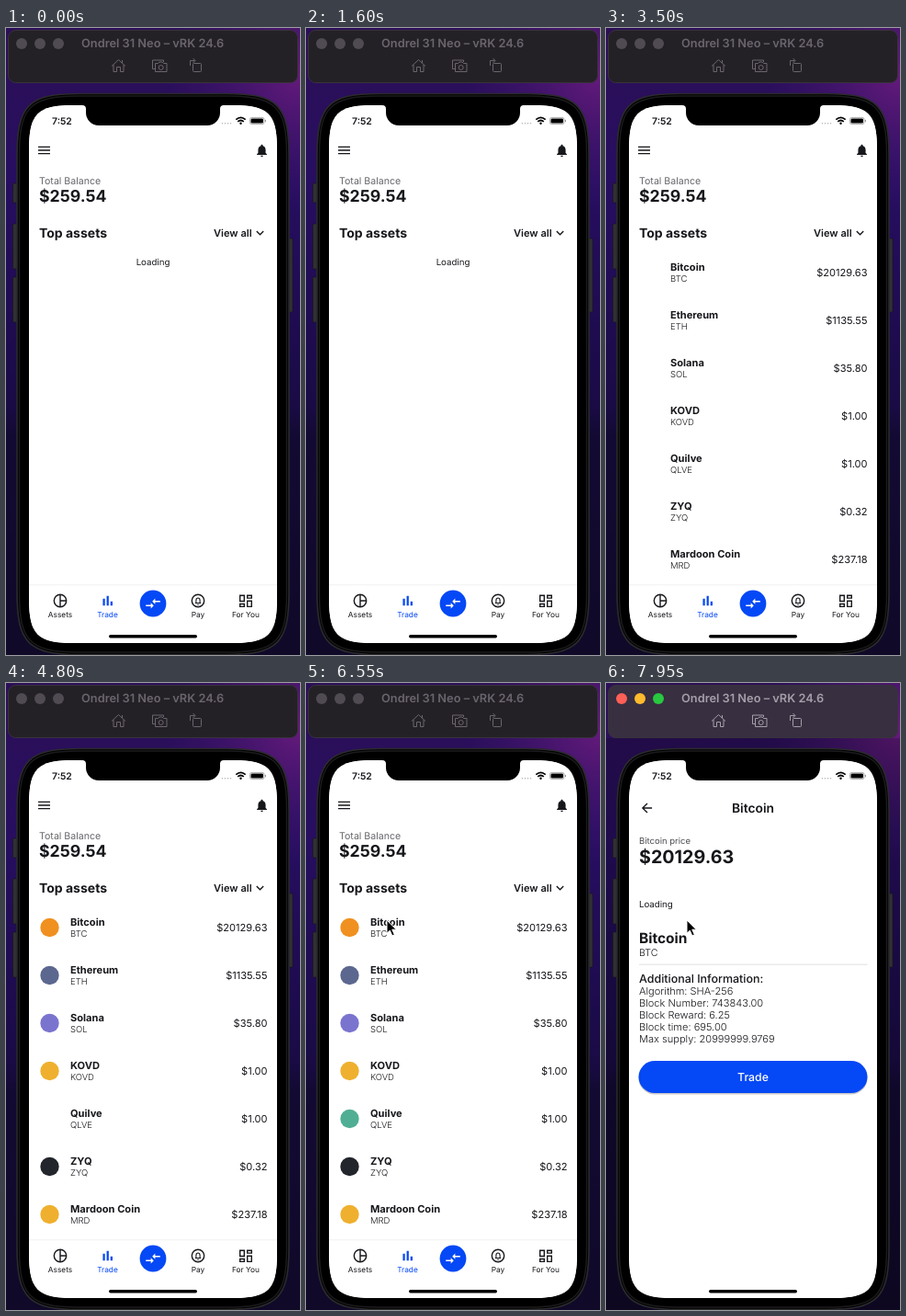
These frames come from a looping animation (320x682 px, 8 s). An HTML page:

```html
<!DOCTYPE html>
<html lang="en">
<head>
<meta charset="utf-8">
<title>Wallet</title>
<style>
html, body { margin: 0; width: 100%; height: 100%; overflow: hidden; background: #170b38; }
svg { display: block; width: 100vw; height: 100vh; }
text { font-family: Inter, Roboto, sans-serif; fill: currentColor; text-rendering: geometricPrecision; }
#chrome { color: #6a656e; }
#screen { color: #16171b; }
.line { fill: none; stroke: currentColor; }
</style>
</head>
<body>
<svg id="stage" viewBox="0 0 320 682"></svg>
<script>
const LOOP = 8000;
const FOCUS = 6900, LIST = 2200, PUSH = 7550, PUSH_END = 7940;
const BLUE = '#0548f5';

const ICONS = {
  menu: 'M3 18h18v-2H3zm0-5h18v-2H3zm0-7v2h18V6z',
  bell: 'M12 22c1.1 0 2-.9 2-2h-4c0 1.1.9 2 2 2zm6-6v-5c0-3.1-1.6-5.6-4.5-6.3V4c0-2-3-2-3 0v.7C7.6 5.4 6 7.9 6 11v5l-2 2v1h16v-1z',
  down: 'M16.6 8.6 12 13.2 7.4 8.6 6 10l6 6 6-6z',
  back: 'M20 11H7.8l5.6-5.6L12 4l-8 8 8 8 1.4-1.4L7.8 13H20z',
  bars: 'M5 9h3v10H5zm5.5-4h3v14h-3zM16 13h3v6h-3z',
  swap: 'M9 14H2v2h7v3l4-4-4-4zm6-1v-3h7V8h-7V5l-4 4z'
};

// name, ticker, price, disc colour, time the disc appears
const COINS = [
  ['Bitcoin', 'BTC', '$20129.63', '#f09020', 3700],
  ['Ethereum', 'ETH', '$1135.55', '#5c678f', 3800],
  ['Solana', 'SOL', '$35.80', '#7a74cf', 3900],
  ['KOVD', 'KOVD', '$1.00', '#efb02f', 4000],
  ['Quilve', 'QLVE', '$1.00', '#50ae94', 5200],
  ['ZYQ', 'ZYQ', '$0.32', '#23252c', 4150],
  ['Mardoon Coin', 'MRD', '$237.18', '#efb02f', 4450]
];

const text = (x, y, size, weight, str, attrs = '') =>
  `<text x="${x}" y="${y}" font-size="${size}" font-weight="${weight}" ${attrs}>${str}</text>`;
const icon = (name, x, y, scale, fill = 'currentColor') =>
  `<path d="${ICONS[name]}" fill="${fill}" transform="translate(${x} ${y}) scale(${scale}) translate(-12 -12)"/>`;
const box = (x, y, w, h, r, fill, attrs = '') =>
  `<rect x="${x}" y="${y}" width="${w}" height="${h}" rx="${r}" fill="${fill}" ${attrs}/>`;
const disc = (x, y, r, fill, attrs = '') =>
  `<circle cx="${x}" cy="${y}" r="${r}" fill="${fill}" ${attrs}/>`;
const MID = 'text-anchor="middle"', END = 'text-anchor="end"';

// Rectangle with continuous corners: long, soft curves instead of plain arcs.
const smooth = (x, y, w, h, r, fill, attrs = '') => {
  const a = 1.5 * r, b = a - .28 * r;
  return `<path fill="${fill}" ${attrs} d="M${x + a} ${y}h${w - 2 * a}c${b} 0 ${a} ${a - b} ${a} ${a}v${h - 2 * a}` +
    `c0 ${b} ${b - a} ${a} ${-a} ${a}h${2 * a - w}c${-b} 0 ${-a} ${b - a} ${-a} ${-a}v${2 * a - h}c0 ${-b} ${a - b} ${-a} ${a} ${-a}z"/>`;
};
const glass = smooth(25, 84, 270, 585, 32.5, '#fff');

const defs = `<defs>
  <linearGradient id="sky" x2="0" y2="1">
    <stop stop-color="#2c0f57"/><stop offset=".25" stop-color="#270e60"/>
    <stop offset=".45" stop-color="#1f0c52"/><stop offset=".6" stop-color="#1a0b45"/>
    <stop offset=".65" stop-color="#130a33"/><stop offset="1" stop-color="#100928"/>
  </linearGradient>
  <radialGradient id="glow" gradientUnits="userSpaceOnUse" cx="320" cy="50" r="150">
    <stop stop-color="#80208a" stop-opacity=".7"/><stop offset="1" stop-color="#4a187c" stop-opacity="0"/>
  </radialGradient>
  <clipPath id="glass">${glass}</clipPath>
</defs>`;

const backdrop = box(0, 0, 320, 682, 0, 'url(#sky)') + box(0, 0, 320, 682, 0, 'url(#glow)') +
  box(0, 60, 320, 622, 0, '#000', 'id="shade" opacity="0"');

const chrome = `<g id="chrome">
  ${box(2.5, 2.5, 315, 57, 8, '#242126', 'id="bar" stroke="#38333c"')}
  ${[17, 37, 57].map(x => disc(x, 17, 6, '#504b53', 'class="light"')).join('')}
  ${text(82, 21, 12.8, 600, 'Ondrel 31 Neo – vRK 24.6')}
  <g class="line" stroke-width="1">
    <path d="M115 41.5 122.5 34.5 130 41.5M117 40v7.5h3.5v-5h4v5h3.5V40M126.5 38v-3"/>
    <path d="M162 44.5h-2.5v-9.5h12v2M162.5 38.5h3l1.5-1.5h3l1.5 1.5h3.5v9h-12.500z"/>
    <circle cx="168.700" cy="43" r="2.500"/>
    <rect x="203.500" y="38.500" width="9" height="9" rx="1"/>
    <path d="M200.500 41v-5.500h5M203.500 33l2.500 2.500-2.500 2.500"/>
  </g>
</g>`;

const button = (x, y, h) => box(x, y, 5, h, 1, '#303033', 'stroke="#17171a" stroke-width=".6"');
const phone = button(7.5, 169, 21) + button(7.5, 213, 49) + button(7.5, 271, 49) + button(307, 229, 80) +
  smooth(12, 71.5, 296, 610, 45, '#000', 'stroke="#2b2b2e" stroke-width="1.6"') +
  smooth(14.5, 74, 291, 605, 42.5, 'none', 'stroke="#1b1b1d" stroke-width="1.5"') + glass;

const row = ([name, ticker, price, colour], i) => `<g transform="translate(0 ${52 * i})">
  ${disc(47.5, 266, 10.2, colour, 'class="coin"')}
  ${text(70, 263.5, 11.1, 700, name)}
  ${text(70, 275.5, 9.5, 300, ticker)}
  ${text(284.5, 269.5, 11.07, 400, price, END)}
</g>`;

const tabs = box(25, 606, 270, 63, 0, '#fff') + box(25, 605.5, 270, .7, 0, '#e9e9ec') +
  `<g class="line" stroke-width="1.4">
    <circle cx="59" cy="623" r="6.7"/><path d="M59 616.3v13.4M59 623h6.7"/>
    <circle cx="209" cy="623" r="6.7"/>
    <path d="M254.7 617.2h4.6v6.3h-4.6zM262.7 617.2h4.6v2.9h-4.6zM254.7 626.5h4.6v2.9h-4.6zM262.7 623.2h4.6v6.2h-4.6z"/>
    <path stroke-width="1.1" d="M205.8 625.5h6.4M206.9 625.5v-2.8c0-3.6 4.2-3.6 4.2 0v2.8M208.2 627.3h1.6"/>
  </g>` +
  icon('bars', 110.7, 623, .75, BLUE) + disc(160, 626, 14.4, BLUE) + icon('swap', 160, 626, .78, '#fff') +
  [[59, 'Assets'], [110.5, 'Trade', BLUE], [209, 'Pay'], [261, 'For You']]
    .map(([x, label, fill]) => text(x, 640.7, 8.3, 400, label, MID + (fill ? ` style="fill:${fill}"` : ''))).join('');

const home = `<g id="home">
  ${box(25, 84, 270, 585, 0, '#fff')}
  ${icon('menu', 41.5, 133, .72)}${icon('bell', 278.5, 133.2, .68)}
  ${text(36, 170, 10.6, 400, 'Total Balance', 'style="fill:#65666b"')}
  ${text(36, 189.3, 17.7, 700, '$259.54')}
  ${text(36, 227.5, 14, 700, 'Top assets')}
  ${text(226, 227, 11.07, 600, 'View all')}${icon('down', 276.5, 223, .7)}
  ${text(160, 257.5, 9.69, 400, 'Loading', MID + ' id="loading"')}
  <g id="list">${COINS.map(row).join('')}</g>
  ${tabs}
</g>`;

const facts = ['Algorithm: SHA-256', 'Block Number: 743843.00', 'Block Reward: 6.25',
  'Block time: 695.00', 'Max supply: 20999999.9769'];
const detail = `<g id="detail">
  ${box(25, 84, 270, 585, 0, '#fff')}
  ${icon('back', 44.5, 136, .7)}
  ${text(160, 141, 13.84, 600, 'Bitcoin', MID)}
  ${text(36, 174.5, 9.5, 400, 'Bitcoin price', 'style="fill:#4b4c50"')}
  ${text(36, 196.3, 19.7, 700, '$20129.63')}
  ${text(36, 244, 9.69, 400, 'Loading')}
  ${text(36, 282.5, 15.5, 700, 'Bitcoin')}
  ${text(36, 296.5, 10.6, 300, 'BTC')}
  ${box(36, 305.7, 248.5, .9, 0, '#dcdce0')}
  ${text(36, 325.5, 12.46, 500, 'Additional Information:')}
  ${facts.map((fact, i) => text(36, 338.7 + 13 * i, 11.07, 300, fact)).join('')}
  ${box(35.5, 412.5, 249, 35, 17.5, '#000', 'opacity=".22"')}
  ${box(35.5, 411, 249, 35, 17.5, BLUE)}
  ${text(160, 433.3, 12.3, 500, 'Trade', MID + ' style="fill:#fff"')}
</g>`;

const status = text(50, 105, 10.4, 600, '7:52') +
  [235.5, 238.5, 241.5, 244.5].map(x => disc(x, 103.7, .8, '#b5b5b8')).join('') +
  `<g class="line" stroke-width="1.7" style="color:#000">
    <path d="M250.3 99.7q5.2-4.6 10.4 0M252.2 101.9q3.3-2.8 6.6 0"/>
  </g>` + disc(255.5, 103.7, 1.2, '#000') +
  box(265.4, 97.4, 15.7, 7.2, 2.2, 'none', 'stroke="#999" stroke-width=".8"') +
  box(266.5, 98.5, 13.5, 5, 1.3, '#000') + box(281.9, 99.7, 1.1, 2.6, .5, '#999') +
  '<path d="M83 83v1a4 4 0 0 1 4 4v4a14 14 0 0 0 14 14h118a14 14 0 0 0 14-14v-4a4 4 0 0 1 4-4v-1z" fill="#000"/>' +
  box(112, 660, 96, 3.4, 1.7, '#000');

const cursor = `<path id="cursor" d="M0 0v14.3l3.3-3.1 2.5 5.7 2.5-1.1-2.5-5.600h4.600z"
  fill="#000" stroke="#fff" stroke-width="1" stroke-linejoin="round"/>`;

const stage = document.getElementById('stage');
stage.innerHTML = defs + backdrop + chrome + phone +
  `<g id="screen"><g clip-path="url(#glass)">${home}${detail}</g>${status}</g>` + cursor;

const find = id => document.getElementById(id);
const play = (el, frames) => el.animate(frames, { duration: LOOP, iterations: Infinity });
const step = (el, prop, at, from, to) => play(el, [
  { [prop]: from, offset: 0 }, { [prop]: from, offset: at / LOOP },
  { [prop]: to, offset: at / LOOP }, { [prop]: to, offset: 1 }
]);
const move = (el, start, end, from, to, easing) => play(el, [
  { transform: from, offset: 0 }, { transform: from, offset: start / LOOP, easing },
  { transform: to, offset: end / LOOP }, { transform: to, offset: 1 }
]);
const shift = (x, y = 0) => `translate(${x}px, ${y}px)`;

step(find('loading'), 'opacity', LIST, 1, 0);
step(find('list'), 'opacity', LIST, 0, 1);
document.querySelectorAll('.coin').forEach((el, i) => step(el, 'opacity', COINS[i][4], 0, 1));

step(find('chrome'), 'color', FOCUS, '#6a656e', '#a59fa9');
step(find('bar'), 'fill', FOCUS, '#242126', '#382f40');
step(find('shade'), 'opacity', FOCUS, 0, .2);
document.querySelectorAll('.light').forEach((el, i) =>
  step(el, 'fill', FOCUS, '#504b53', ['#fe5f57', '#febb2e', '#28c840'][i]));

const glide = 'cubic-bezier(.2, .75, .25, 1)';
move(find('home'), PUSH, PUSH_END, shift(0), shift(-81), glide);
move(find('detail'), PUSH, PUSH_END, shift(270), shift(0), glide);
move(find('cursor'), 5700, 6350, shift(326, 340), shift(88, 258), 'ease-in-out');
</script>
</body>
</html>
```
